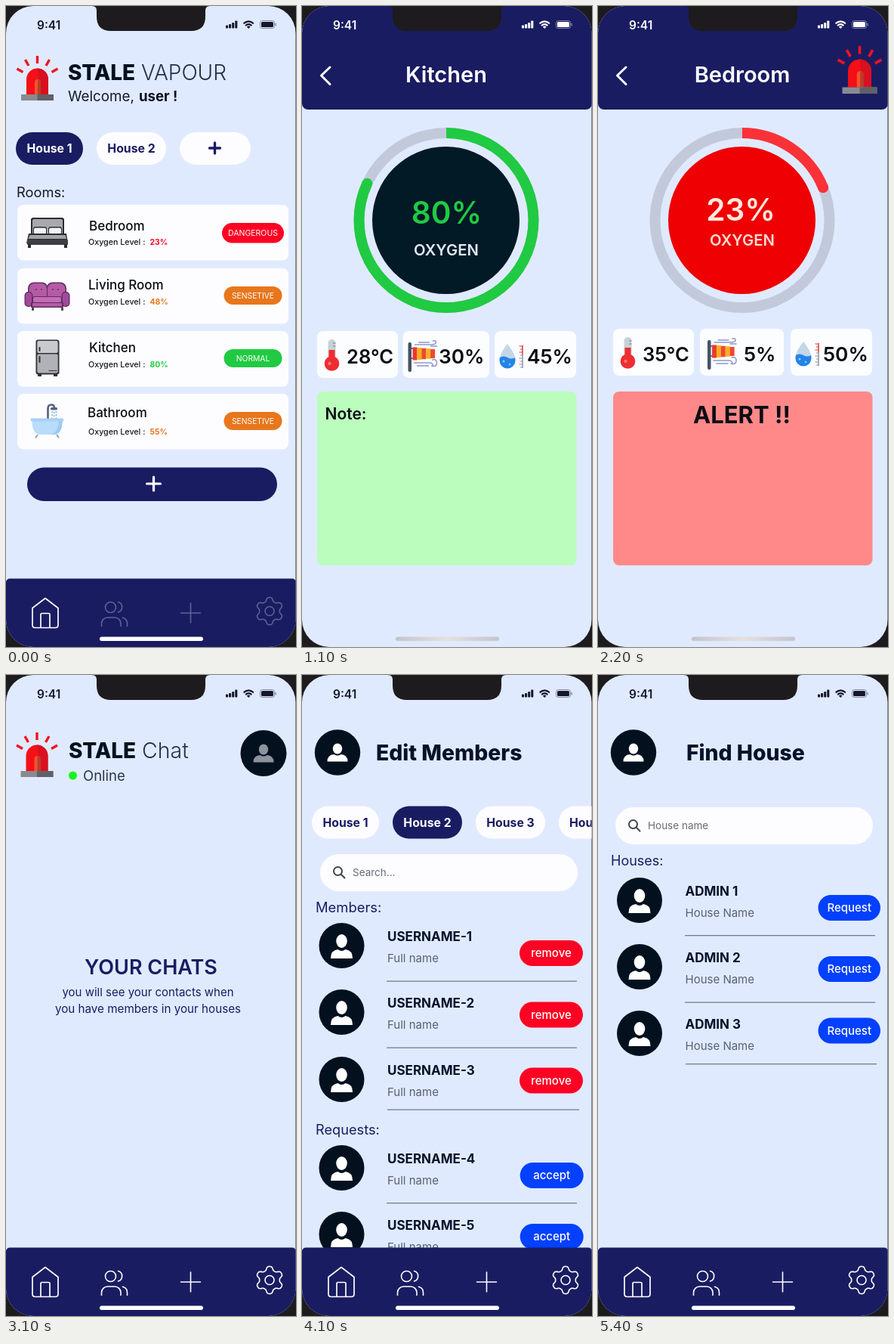
Animation of 384x848 px, one loop 5.7 s. Source, as an HTML page with a canvas:

```html
<!DOCTYPE html>
<html lang="en">
<head>
<meta charset="utf-8">
<title>Room air monitor</title>
<style>
  html, body { margin: 0; width: 100%; height: 100%; overflow: hidden; background: #1d1b1e; }
  canvas { display: block; width: 384px; height: 848px; }
</style>
</head>
<body>
<canvas id="stage" width="384" height="848"></canvas>
<script>
const W = 384, H = 848, LOOP = 5700, STEP = 100;
const NAVY = '#1a1c62', BG = '#e0eaff', DARK = '#1d1b1e', INK = '#03111f';
const RED = '#fd0223', ORANGE = '#e8761c', GREEN = '#20ca42', BLUE = '#0340ff';
let c;

function text(s, x, y, size, weight = 400, color = '#0b0d14', align = 'left') {
  c.font = `${weight} ${size}px Inter, sans-serif`;
  c.textAlign = align;
  c.fillStyle = color;
  c.fillText(s, x, y);
}

function box(x, y, w, h, r, color) {
  c.fillStyle = color;
  c.beginPath();
  c.roundRect(x, y, w, h, r);
  c.fill();
}

function disc(x, y, r, color, ry = r) {
  c.fillStyle = color;
  c.beginPath();
  c.ellipse(x, y, r, ry, 0, 0, 7);
  c.fill();
}

function fill(d, color) {
  c.fillStyle = color;
  c.fill(new Path2D(d));
}

function line(d, color, width) {
  c.strokeStyle = color;
  c.lineWidth = width;
  c.stroke(new Path2D(d));
}

function plus(x, y, r, color, width) {
  line(`M${x - r} ${y}H${x + r}M${x} ${y - r}V${y + r}`, color, width);
}

function pill(s, x, y, w, h, color, size, weight, ink = '#fff') {
  box(x, y, w, h, h / 2, color);
  text(s, x + w / 2, y + h / 2 + size * 0.36, size, weight, ink, 'center');
}

function chip(s, x, y, w, active) {
  pill(s, x, y, w, 43, active ? NAVY : '#fdfdff', 15.8, 700, active ? '#fff' : NAVY);
}

// Origin: middle of the bottom edge of the base.
function siren(x, y, scale = 1) {
  c.save();
  c.translate(x, y);
  c.scale(scale, scale);
  c.lineCap = 'butt';
  line('M-27-42l8 4.5M-16-54l4.5 8M0-59v10M16-54l-4.5 8M27-42l-8 4.5', '#f3131f', 3.4);
  fill('M-14.5-8V-28a14.500 14.500 0 0 1 29 0V-8Z', '#f50f17');
  fill('M0-42.500a14.500 14.500 0 0 1 14.500 14.500V-8H4Z', '#d8101f');
  fill('M-3.500-8V-24a4 4 0 0 1 8 0V-8Z', '#f5532d');
  fill('M.5-28a4 4 0 0 1 4 4V-8H.5Z', '#b5402d');
  box(-21.5, -8, 43, 8, 0, '#888b92');
  box(0, -8, 21.5, 8, 0, '#5f6168');
  c.restore();
}

function person(x, y, color = '#fff') {
  disc(x, y - 5, 6.2, color, 7);
  fill(`M${x - 13.5} ${y + 12}q0-9 9-9.500q4.500 3 9 0q9 .5 9 9.500Z`, color);
}

function avatar(x, y) {
  disc(x, y, 30, INK);
  disc(x, y - 6, 7.3, '#fff', 9);
  fill(`M${x - 14.5} ${y + 17}q0-11 9.500-12q5 4 10 0q9.500 1 9.500 12Z`, '#fff');
}

function status(color) {
  text('9:41', 41, 30.5, 15.5, 600, color);
  [4, 5.5, 7.5, 10].forEach((h, i) => box(291 + i * 4.1, 29.5 - h, 3, h, 0.8, color));
  c.lineCap = 'butt';
  line('M314.500 23.300q6.700-6 13.400 0M317 26q4.200-3.600 8.400 0', color, 2.1);
  fill('M321.200 30l-2.400-2.600q2.400-1.900 4.800 0Z', color);
  c.globalAlpha = 0.45;
  c.lineWidth = 1;
  c.strokeStyle = color;
  c.beginPath();
  c.roundRect(336.5, 19.5, 19, 10, 3);
  c.stroke();
  box(356.5, 22.5, 1.3, 4, 0.6, color);
  c.globalAlpha = 1;
  box(338, 21, 16, 7, 1.6, color);
}

function gear(x, y) {
  c.beginPath();
  for (let i = 0; i <= 120; i++) {
    const a = i * Math.PI / 60;
    const r = 15.7 + 2.6 * Math.tanh(1.6 * Math.cos(6 * a));
    c.lineTo(x + r * Math.sin(a), y - r * Math.cos(a));
  }
  c.closePath();
  c.stroke();
  c.beginPath();
  c.arc(x, y, 6, 0, 7);
  c.stroke();
}

function tabs(dim) {
  box(0, 757.5, W, 92, [5, 5, 0, 0], NAVY);
  c.lineCap = c.lineJoin = 'round';
  line('M35 796.500L52 783.500L69 796.500V819q0 3.500-3.500 3.500H38.500q-3.500 0-3.500-3.500ZM46 822V805q0-1.500 1.500-1.500h9q1.500 0 1.500 1.500V822', '#fff', 1.7);
  c.globalAlpha = dim ? 0.3 : 1;
  line('M145.500 795.500a7 7 0 1 1-14 0a7 7 0 1 1 14 0M126.500 820.500v-3.500a8 8 0 0 1 8-8h9.500a8 8 0 0 1 8 8v3.500M148.500 788.500a7 7 0 0 1 0 13.500M154.500 809.300q6 1.500 6 7.700v3.500', '#fff', 1.6);
  plus(244.5, 803, 13, '#fff', 1.6);
  gear(349, 800.5);
  c.globalAlpha = 1;
}

function bed() {
  c.lineJoin = 'round';
  box(33, 280, 44, 24, 3, '#2b2d33');
  box(35, 282, 40, 20, 2, '#a9a9ad');
  box(36, 292, 18, 10, 3, '#2b2d33');
  box(56, 292, 18, 10, 3, '#2b2d33');
  box(37, 293.5, 16, 8, 2, '#f2f2f4');
  box(57, 293.5, 16, 8, 2, '#f2f2f4');
  fill('M30 301H80L82 314H27Z', '#2b2d33');
  fill('M31.500 303H78.500L80 308H29.500Z', '#a3a3a8');
  box(28, 309, 54, 7, 1, '#3d3e43');
  box(29, 315, 4, 5, 0, '#2b2d33');
  box(77, 315, 4, 5, 0, '#2b2d33');
}

function sofa() {
  const edge = '#5b2d63', pink = '#b55aa4';
  box(29, 365.500, 26.500, 28, 8, edge);
  box(53.500, 365.500, 26.500, 28, 8, edge);
  box(30.500, 367, 23.500, 25, 7, pink);
  box(55, 367, 23.500, 25, 7, pink);
  box(35, 384, 39, 9, 3, edge);
  box(36, 385, 37, 7, 2, '#c56cb4');
  for (const x of [24.500, 73.500]) {
    box(x, 378, 11, 20, 5, edge);
    box(x + 1.3, 379.3, 8.400, 17.400, 4, '#a24a99');
  }
  box(33, 392, 43, 7, 1, edge);
  box(35, 393, 39, 4.500, 1, pink);
  box(34, 399, 3, 4, 1, '#52404a');
  box(73, 399, 3, 4, 1, '#52404a');
  [40, 47, 62, 69].forEach(x => disc(x, 375, 1, edge));
}

function fridge() {
  box(39.500, 441.500, 31, 46, 3, '#303238');
  box(41.300, 443, 27.400, 16, 2, '#c9cace');
  box(41.300, 460.500, 27.400, 25, 2, '#b1b2b7');
  box(43.500, 451, 2, 6, 1, '#303238');
  box(43.500, 463, 2, 9, 1, '#303238');
  line('M57 482.500H67', '#303238', 1.2);
  box(42, 487, 5, 3, 0, '#303238');
  box(63, 487, 5, 3, 0, '#303238');
}

function bath() {
  c.lineCap = 'butt';
  line('M55.500 547V533q0-5.500 4.500-5.500q4 0 4 4', '#55637a', 2.600);
  box(59, 531, 9, 3.500, 1.5, '#55637a');
  c.setLineDash([2, 2.2]);
  line('M61 536V546M63.700 537V546M66.400 536V546', '#5ba6dd', 1.200);
  c.setLineDash([]);
  fill('M34.500 549H74.500q0 18-12 18H46.500q-12 0-12-18Z', '#b9dcfb');
  fill('M58 567h4.500q12 0 12-18H70q-1 16-12 18Z', '#9cc9f1');
  box(32.500, 545.500, 44, 4, 2, '#a6d0f6');
  line('M42 567l-3 4.500M67 567l3 4.500', '#8da5bd', 2);
}

function thermometer(y) {
  box(34.500, y + 11, 10, 36, 5, '#c7d2d6');
  disc(39.500, y + 43, 9.800, '#ed2d31');
  box(35.500, y + 25, 8, 14, 0, '#ed2d31');
  line(`M41 ${y + 16}h3.500M41 ${y + 20}h3.500`, '#718087', 1);
  disc(36.500, y + 43, 2.200, '#ff7671');
}

function windsock(x, y) {
  c.lineCap = 'round';
  line(`M${x + 9} ${y + 18}h21q7 0 7-3t-4-2M${x + 8} ${y + 42}h20q5 0 5 4M${x + 12} ${y + 46}h15M${x + 30} ${y + 20}h8M${x + 32} ${y + 38}q7-1 6 5q-1 5-7 3M${x + 14} ${y + 15}h14`, '#8f99c6', 1.5);
  box(x, y + 15, 4.500, 39, 2, '#465365');
  line(`M${x + 4} ${y + 23}h4M${x + 4} ${y + 36}h4`, '#465365', 1.500);
  ['#e83b2f', '#ffad22', '#ec4a2e', '#ffad22', '#ec4a2e'].forEach((color, i) => {
    const h = 17 - i * 1.2;
    box(x + 6 + i * 5.900, y + 30 - h / 2, 6, h, 0, color);
  });
}

function drop(y) {
  fill(`M272 ${y + 17}q10.500 13 10.500 21.500a10.500 10.500 0 0 1-21 0q0-8.500 10.500-21.500Z`, '#c2d7e8');
  fill(`M262 ${y + 35}q5-3 10 0t10 0q.5 2 .5 4a10.500 10.500 0 0 1-21 0q0-2 .5-4Z`, '#2384e8');
  disc(267, y + 40, 1.600, '#8cc9fb');
  disc(275, y + 44, 1.300, '#8cc9fb');
  c.lineCap = 'butt';
  for (let i = 0; i < 8; i++) {
    line(`M${i % 2 ? 289 : 287.500} ${y + 20 + i * 4}H292`, i < 3 ? '#d93b3b' : '#8c93a3', 1.200);
  }
  line(`M292 ${y + 19}V${y + 31}`, '#d93b3b', 1.500);
  line(`M292 ${y + 31}V${y + 49}`, '#8c93a3', 1.500);
}

function indicator(detail) {
  let color = '#fff';
  if (detail) {
    color = c.createLinearGradient(124, 0, 261, 0);
    color.addColorStop(0, '#c3c4cc');
    color.addColorStop(0.5, '#e6e0e0');
    color.addColorStop(1, '#c3c4cc');
  }
  box(124, 834.5, 137, 5.500, 2.700, color);
}

function phone(draw, opts = {}) {
  const canvas = document.createElement('canvas');
  canvas.width = W;
  canvas.height = H;
  c = canvas.getContext('2d');
  box(0, 0, W, H, 0, DARK);
  c.save();
  c.beginPath();
  c.roundRect(0, 0, W - 0.5, H, 36);
  c.clip();
  box(0, 0, W, H, 0, BG);
  draw();
  if (!opts.detail) tabs(opts.dim);
  status(opts.detail ? '#fff' : '#14162a');
  indicator(opts.detail);
  c.restore();
  fill('M114 0q6 0 6 6v8q0 19 19 19h106q19 0 19-19v-8q0-6 6-6Z', DARK);
  return canvas;
}

function home() {
  siren(41.5, 125);
  text('STALE', 82, 97.5, 28, 800, INK);
  text('VAPOUR', 179, 97.5, 28, 300, '#262d4c');
  text('Welcome,', 82, 126, 18.8, 400, '#14182b');
  text('user !', 176, 126, 18.6, 700, '#0a0e20');
  chip('House 1', 13, 167, 89, true);
  chip('House 2', 120, 167, 92);
  chip('', 230, 167, 94);
  c.lineCap = 'round';
  plus(276.5, 188, 7, NAVY, 3.3);
  text('Rooms:', 14, 253, 18.3, 400, '#14182b');
  const rooms = [
    ['Bedroom', '23%', 'DANGEROUS', RED, 263, 110, 296.5, 315.5, bed],
    ['Living Room', '48%', 'SENSETIVE', ORANGE, 347, 109, 375, 395, sofa],
    ['Kitchen', '80%', 'NORMAL', GREEN, 430, 110, 457.5, 478, fridge],
    ['Bathroom', '55%', 'SENSETIVE', ORANGE, 513, 108, 543.5, 567, bath]
  ];
  for (const [name, level, state, color, y, x, nameY, levelY, icon] of rooms) {
    box(15, y, 359, 73.5, 8, '#fdfdff');
    icon();
    text(name, x, nameY, 17, 500);
    text('Oxygen Level :', 109, levelY, 10.7, 500, '#15171f');
    text(level, 190.5, levelY, 10.4, 700, color);
    if (color === RED) pill(state, 286, 287, 82, 26.5, color, 10.5, 400);
    else pill(state, 288.5, y + 24, 77, 24, color, 10.3, 400);
  }
  box(28, 610.5, 331, 44.5, 22.2, NAVY);
  c.lineCap = 'round';
  plus(195.5, 632, 9, '#fff', 3.2);
}

function gauge(degrees, color, core) {
  const x = 191, y = 283.5, r = 115.5, a = degrees * Math.PI / 180;
  c.lineCap = 'butt';
  c.lineWidth = 14;
  c.strokeStyle = '#c2c9da';
  c.beginPath();
  c.arc(x, y, r, 0, 7);
  c.stroke();
  c.strokeStyle = color;
  c.beginPath();
  c.arc(x, y, r, -Math.PI / 2, a - Math.PI / 2);
  c.stroke();
  disc(x + r * Math.sin(a), y - r * Math.cos(a), 7, color);
  disc(190.5, y, 97.5, core);
}

function detail(p) {
  const y = p.alert ? 427 : 430;
  box(0, -10, W, 147, 8, NAVY);
  c.lineCap = c.lineJoin = 'round';
  line('M37 81L25.500 92L37 103.500', '#fff', 3);
  text(p.name, 191, 100.5, 29, 600, '#fff', 'center');
  gauge(p.angle, p.color, p.alert ? '#ee0003' : '#021926');
  text(p.level, p.alert ? 189 : 191.5, p.alert ? 283.5 : 288, 40.5, 600, p.alert ? '#ffe9de' : p.color, 'center');
  text('OXYGEN', 191, p.alert ? 316.5 : 330, 20.3, 600, p.alert ? '#ffdcd4' : '#dfe8f6', 'center');
  const [left, width] = p.windBox;
  box(20, y, 107, 62, 8, '#fcfdff');
  box(left, y, width, 62, 8, '#fcfdff');
  box(255, y, 108, 62, 8, '#fcfdff');
  thermometer(y);
  windsock(p.poleX, y);
  drop(y);
  text(p.heat, 59, y + 43, 25.5, 600);
  text(p.wind, p.windX, y + 43, 26.3, 600);
  text(p.damp, 298, y + 43, 26.3, 600);
  box(20, 510, 343.5, 230, 8, p.note);
  if (p.alert) text('ALERT !!', 190.5, 552, 31, 700, '#0b0d14', 'center');
  else text('Note:', 30.5, 547, 21, 600);
  if (p.alert) siren(346.5, 116, 1.07);
}

function chat() {
  siren(41, 135);
  text('STALE', 83, 109.5, 28, 800, INK);
  text('Chat', 180, 109.5, 28.5, 300, '#262d4c');
  disc(88.5, 133, 5.5, '#16f31f');
  text('Online', 102, 140, 18.5, 400, '#2b334c');
  disc(341, 103.5, 30.5, INK);
  person(341, 103.5, '#8d949e');
  text('YOUR CHATS', 192, 395.5, 27, 600, NAVY, 'center');
  text('you will see your contacts when', 188, 424.5, 15, 400, NAVY, 'center');
  text('you have members in your houses', 188, 446.5, 15.2, 400, NAVY, 'center');
}

function search(hint, x, y) {
  box(x, y, 341, 49, 24.5, '#fdfdff');
  c.lineCap = 'round';
  c.lineWidth = 2;
  c.strokeStyle = '#3f434c';
  c.beginPath();
  c.arc(x + 23.5, y + 22.5, 5.5, 0, 7);
  c.stroke();
  line(`M${x + 28} ${y + 27}l4.500 4.500`, '#3f434c', 2);
  text(hint, x + 43, y + 29, 13.5, 400, '#666b75');
}

function heading(s, x) {
  disc(47, 102.5, 30.2, INK);
  person(47, 102.5);
  text(s, x, 113, 28.3, 800, '#06122a');
}

function row(x, y, name, sub, action, px, py, color) {
  avatar(x, y);
  text(name, x + 60.5, y - 6, 17, 700, '#06122a');
  text(sub, x + 60.5, y + 21.8, 15, 400, '#596072');
  pill(action, px, py, px < 290 ? 84 : 82.5, 34, color, 15, 500);
}

function rule(x, y, w) {
  box(x, y, w, 1.3, 0, '#727a8c');
}

function members() {
  heading('Edit Members', 98);
  [13, 120, 230, 340].forEach((x, i) => chip('House ' + (i + 1), x, 173.5, i ? 92 : 89, i === 1));
  search('Search...', 24, 237);
  text('Members:', 18, 314, 18.4, 400, NAVY);
  [[358, 351], [446, 432.5], [535, 519.5]].forEach(([y, py], i) =>
    row(52.5, y, 'USERNAME-' + (i + 1), 'Full name', 'remove', 288, py, RED));
  text('Requests:', 18, 607.5, 18.2, 400, NAVY);
  [[652, 645], [740, 726]].forEach(([y, py], i) =>
    row(52.5, y, 'USERNAME-' + (i + 4), 'Full name', 'accept', 288.7, py, BLUE));
  rule(112, 404.5, 252);
  rule(112, 492.5, 252);
  rule(113, 574.5, 254);
  rule(112, 698, 252);
}

function finder() {
  heading('Find House', 117);
  search('House name', 23, 175);
  text('Houses:', 17, 252, 18, 400, NAVY);
  [[298, 291], [386, 372], [474, 453.5]].forEach(([y, py], i) =>
    row(55, y, 'ADMIN ' + (i + 1), 'House Name', 'Request', 291.5, py, BLUE));
  rule(115, 344, 252);
  rule(115, 432.5, 252);
  rule(116, 514, 253);
}

const room = p => phone(() => detail(p), { detail: true });
const pages = {
  home: phone(home, { dim: true }),
  living: room({ name: 'Living Room', level: '48%', angle: 170, color: '#ff6532', note: '#fdcfbd',
    heat: '23°C', wind: '15%', damp: '30%', windBox: [135, 111], poleX: 145, windX: 187 }),
  kitchen: room({ name: 'Kitchen', level: '80%', angle: 295, color: '#20ca42', note: '#bafdbc',
    heat: '28°C', wind: '30%', damp: '45%', windBox: [133.500, 114.500], poleX: 140.500, windX: 181 }),
  bedroom: room({ name: 'Bedroom', level: '23%', angle: 68, color: '#fb3138', note: '#ff8989', alert: true,
    heat: '35°C', wind: '5%', damp: '50%', windBox: [135, 111], poleX: 145, windX: 193 }),
  chat: phone(chat),
  members: phone(members),
  finder: phone(finder)
};

// Start in ms and the page that is cut to.
const cues = [
  [0, 'home'], [100, 'living'], [700, 'home'], [1000, 'kitchen'], [1800, 'home'],
  [2000, 'bedroom'], [2400, 'home'], [3100, 'chat'], [3800, 'members'], [4600, 'finder']
];

const stage = document.getElementById('stage').getContext('2d');
const began = performance.now();

function show() {
  const time = (performance.now() - began) % LOOP;
  const t = Math.floor(time / STEP) * STEP;
  const [, name] = cues.findLast(cue => cue[0] <= t);
  stage.drawImage(pages[name], 0, 0);
  requestAnimationFrame(show);
}
show();
</script>
</body>
</html>
```
